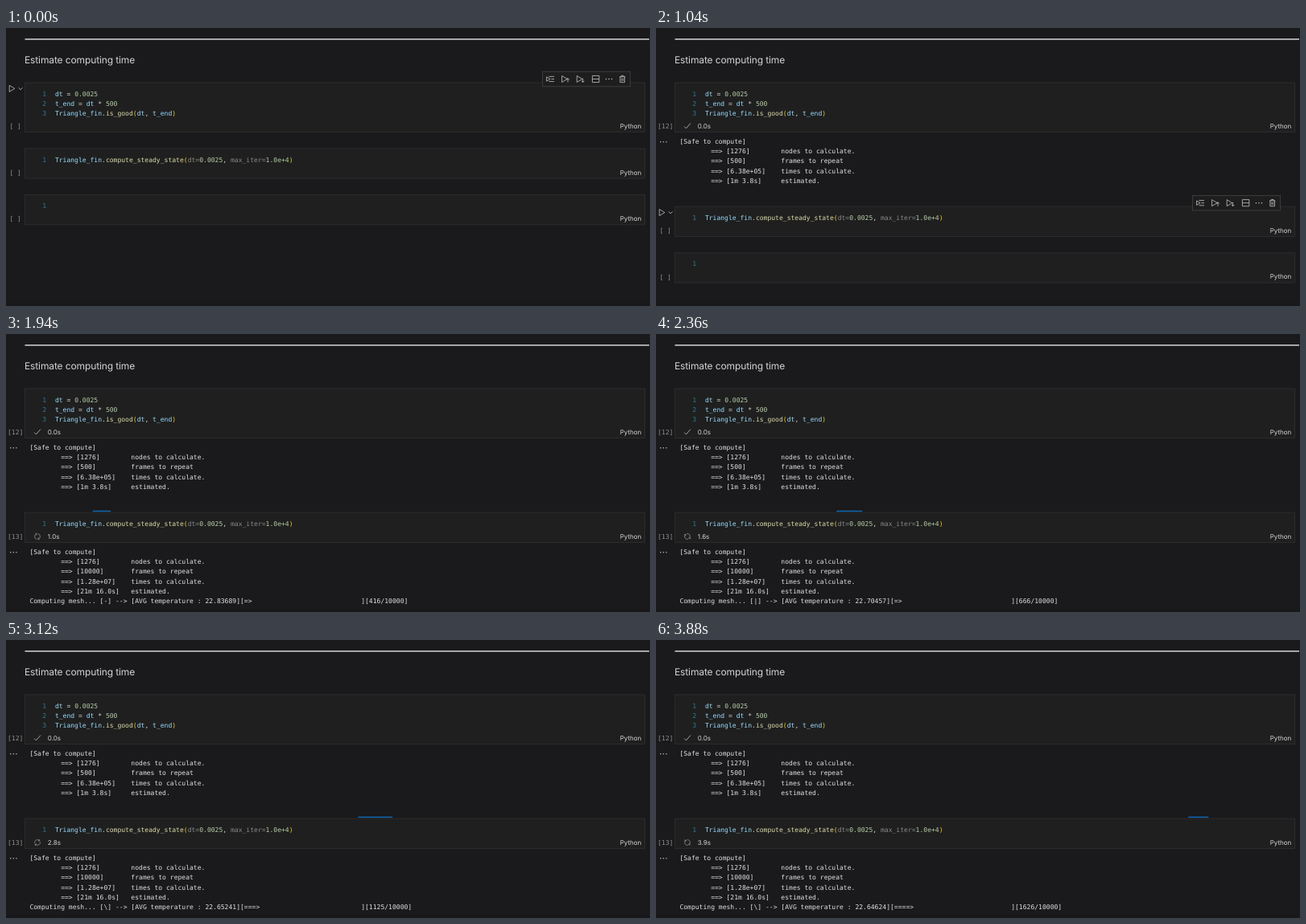
Animation of 800x346 px, one loop 3.9 s. Source, as an HTML page:

```html
<!DOCTYPE html>
<html lang="en">
<head>
<meta charset="utf-8">
<title>Notebook run</title>
<style>
  html, body { margin: 0; width: 100%; height: 100%; overflow: hidden; background: #1a191b; }
  svg { display: block; width: 800px; height: 346px; text-rendering: geometricPrecision; }
  text { white-space: pre; fill: #d4d4d4; }
  .mono { font: 8.06px "DejaVu Sans Mono", monospace; }
  .ui { font: 8px Inter, sans-serif; }
  .title { font: 12px Inter, sans-serif; letter-spacing: -.12px; }
  .out text { fill: #e2e2e2; }
  .box { fill: #1f1f1f; stroke: #303031; stroke-width: .8; }
  .icon { fill: none; stroke: #c5c5c5; stroke-width: .8; }
  .dots { fill: #c5c5c5; }
  .label { fill: #8f8f8f; }
  .ln { fill: #2b7c94; }
  .var { fill: #9cdcfe; }
  .num { fill: #b5cea8; }
  .fn { fill: #dcdcaa; }
  .par { fill: #f2cb1d; }
  .arg { fill: #8a8a8a; }
</style>
</head>
<body>
<svg id="stage" viewBox="0 0 800 346"></svg>
<script>
const LOOP = 3900, STEP = 20;
const RUN1 = 480, OUT1 = 560, DONE1 = 680;
const RUN2 = 1220, START2 = 1250, OUT2 = 1280;
const BAR_START = 1636, BAR_PERIOD = 2667;
const TOTAL = 10000, LIMIT = 22.6455;
const LEFT = 23.5, TRACK = 770;

// time, iteration, average temperature
const samples = [
  [1256, 0, 24.45], [1320, 39, 24.10771], [1940, 416, 22.83689],
  [2780, 915, 22.66373], [3460, 1334, 22.64812], [3880, 1626, 22.64624]
];

const s = (cls, str) => `<tspan class="${cls}">${str}</tspan>`;
const dots = (x, y, gap) => [-1, 0, 1].map(i =>
  `<circle class="dots" cx="${x + i * gap}" cy="${y}" r=".75"/>`).join('');

const fin = s('var', 'Triangle_fin') + '.';
const code = [
  [
    `${s('var', 'dt')} = ${s('num', '0.0025')}`,
    `${s('var', 't_end')} = ${s('var', 'dt')} * ${s('num', '500')}`,
    `${fin}${s('fn', 'is_good')}${s('par', '(')}${s('var', 'dt')}, ${s('var', 't_end')}${s('par', ')')}`
  ],
  [
    `${fin}${s('fn', 'compute_steady_state')}${s('par', '(')}${s('arg', 'dt=')}${s('num', '0.0025')}, ` +
    `${s('arg', 'max_iter=')}${s('num', '1.0e+4')}${s('par', ')')}`
  ],
  ['']
];
const height = lines => 37.2 + (lines.length - 1) * 12.1;

function report(nodes, frames, times, estimate) {
  const row = (value, note) => '        ==&gt; ' + `[${value}]`.padEnd(14) + note;
  return ['[Safe to compute]', row(nodes, 'nodes to calculate.'), row(frames, 'frames to repeat'),
    row(times, 'times to calculate.'), row(estimate, 'estimated.')];
}

function output(lines, y) {
  return `<g class="out" transform="translate(0 ${y})">${dots(9.3, 12.4, 3.6)}` +
    lines.map((l, i) => `<text class="mono" x="29.4" y="${15 + i * 12.05}">${l}</text>`).join('') + '</g>';
}

function cell(lines, outLines) {
  const h = height(lines);
  return `<g class="cell">
    <rect class="box" x="${LEFT}" y="0" width="${TRACK}" height="${h}"/>
    ${lines.map((l, i) => `<text class="mono ln" x="45.2" y="${16.6 + i * 12.1}">${i + 1}</text>
      <text class="mono" x="60.9" y="${16.6 + i * 12.1}">${l}</text>`).join('')}
    <text class="mono label" x="11.7" y="${h - 4.4}" text-anchor="middle">[ ]</text>
    <text class="ui" x="789.3" y="${h - 4.5}" text-anchor="end">Python</text>
    <g class="status" transform="translate(39 ${h - 7.4})">
      <path class="icon tick" d="M-3.9 .6L-1.6 2.9L3.9 -3.4"/>
      <g class="spin"><path class="icon" transform="scale(.62)" stroke-width="1.3"
        d="M-5.5 0A5.5 5.5 0 0 0 4.7 2.9M5.5 0A5.5 5.5 0 0 0 -4.7 -2.9M-7.6 1.3L-5.4 -.9L-3.2 1.3M7.6 -1.3L5.4 .9L3.2 -1.3"/></g>
      <text class="ui time" x="12.8" y="2.9">0.0s</text>
    </g>
    ${outLines ? output(outLines, h) : ''}
  </g>`;
}

const play = (x, y, r) => `M${x} ${y - r}L${x + r * 1.65} ${y}L${x} ${y + r}Z`;
const tools = `<g id="tools">
  <path class="icon" d="${play(4.2, 7.4, 4)}M15.6 6.3L18.1 8.7L20.6 6.3"/>
  <rect x="666.4" y="-13.8" width="109.2" height="18.6" fill="#1e1e1e" stroke="#434343" stroke-width=".8"/>
  <g class="icon">
    <path d="${play(671.6, -4.5, 2.7)}M674.5 -7.6H681M677.3 -4.5H681M674.5 -1.4H681"/>
    <path d="${play(690.6, -4.5, 4)}M698 -.4V-5.4M696.2 -3.6L698 -5.4L699.8 -3.6"/>
    <path d="${play(709.2, -4.5, 4)}M716.6 -5.4V-.4M714.8 -2.2L716.6 -.4L718.4 -2.2"/>
    <path d="M728.4 -8.6H736.8V-.4H728.4ZM728.4 -4.5H736.8"/>
    <path d="M762 -7.3H769.4M764.4 -7.3V-8.7H767V-7.3M762.9 -7.3V-.4H768.5V-7.3M764.8 -5.6V-2M766.6 -5.6V-2"/>
  </g>
  ${dots(749, -4.5, 3.5)}
</g>`;

const stage = document.getElementById('stage');
stage.innerHTML = `
  <rect width="800" height="346" fill="#1a191b"/>
  <rect x="23.5" y="13.2" width="775.5" height="1.5" fill="#d6d6d6"/>
  <text class="title" x="23" y="44">Estimate computing time</text>
  ${cell(code[0], report(1276, 500, '6.38e+05', '1m 3.8s'))}
  ${cell(code[1], [...report(1276, TOTAL, '1.28e+07', '21m 16.0s'), ''])}
  ${cell(code[2])}
  ${tools}
  <rect id="bar" y="219.8" height="1.3" fill="#0e70c0"/>
  <rect y="342" width="800" height="4" fill="#181719"/>`;

const bar = document.getElementById('bar');
const toolbar = document.getElementById('tools');
const cells = [...stage.querySelectorAll('.cell')].map(g => ({
  g, label: g.querySelector('.label'), status: g.querySelector('.status'),
  tick: g.querySelector('.tick'), spin: g.querySelector('.spin'),
  time: g.querySelector('.time'), out: g.querySelector('.out')
}));
const meter = cells[1].out.lastElementChild;

const show = (el, on) => el.setAttribute('visibility', on ? 'inherit' : 'hidden');
const moveTo = (el, y) => el.setAttribute('transform', `translate(0 ${y})`);

function progress(t) {
  let i = 1;
  while (i < samples.length - 1 && t > samples[i][0]) i++;
  const [t0, n0, a] = samples[i - 1], [t1, n1, b] = samples[i];
  const k = Math.max(0, (t - t0) / (t1 - t0));
  const n = Math.round(n0 + (n1 - n0) * k);
  const temp = LIMIT + (a - LIMIT) * ((b - LIMIT) / (a - LIMIT)) ** k;
  const wheel = '-/|\\'[(Math.floor(n / 14) + 3) % 4];
  const arrow = ('='.repeat(Math.floor(n * 30 / TOTAL)) + '>').padEnd(30);
  return `Computing mesh... [${wheel}] --> [AVG temperature : ${temp.toFixed(5)}][${arrow}][${n}/${TOTAL}]`;
}

function setCell(c, t, run, out, done, count) {
  show(c.status, t >= run);
  show(c.tick, t >= run && t >= done);
  show(c.spin, t >= run && t < done);
  show(c.out, t >= out);
  c.label.textContent = t >= out ? `[${count}]` : '[ ]';
}

function drawBar(t) {
  const p = (t - BAR_START) / BAR_PERIOD;
  show(bar, p >= 0);
  if (p < 0) return;
  const unit = TRACK * .02;
  const shift = p < .5 ? p * 50 : 25 + (p - .5) * 49;
  const w = unit * (3 - 4 * Math.abs(p - .5));
  const mid = LEFT + unit * (.5 + shift);
  const x = Math.max(LEFT, mid - w / 2);
  bar.setAttribute('x', x);
  bar.setAttribute('width', mid + w / 2 - x);
}

function draw(t) {
  const tops = [68, t < OUT1 ? 150 : 222.2, t < OUT1 ? 207.6 : t < OUT2 ? 279.8 : 364];
  cells.forEach((c, i) => moveTo(c.g, tops[i]));
  moveTo(toolbar, tops[t < RUN1 ? 0 : t < RUN2 ? 1 : 2]);

  setCell(cells[0], t, RUN1, OUT1, DONE1, 12);
  setCell(cells[1], t, RUN2, OUT2, LOOP, 13);
  show(cells[2].status, false);

  cells[0].spin.setAttribute('transform', `rotate(${(t - RUN1) * .36})`);
  cells[1].spin.setAttribute('transform', `rotate(${(t - START2) * .36})`);
  const tenths = Math.max(0, Math.floor((t - START2) * .015));
  cells[1].time.textContent = (tenths / 10).toFixed(1) + 's';
  meter.textContent = progress(t);
  drawBar(t);
}

function tick() {
  draw(Math.floor(performance.now() % LOOP / STEP) * STEP);
  requestAnimationFrame(tick);
}
tick();
</script>
</body>
</html>
```
